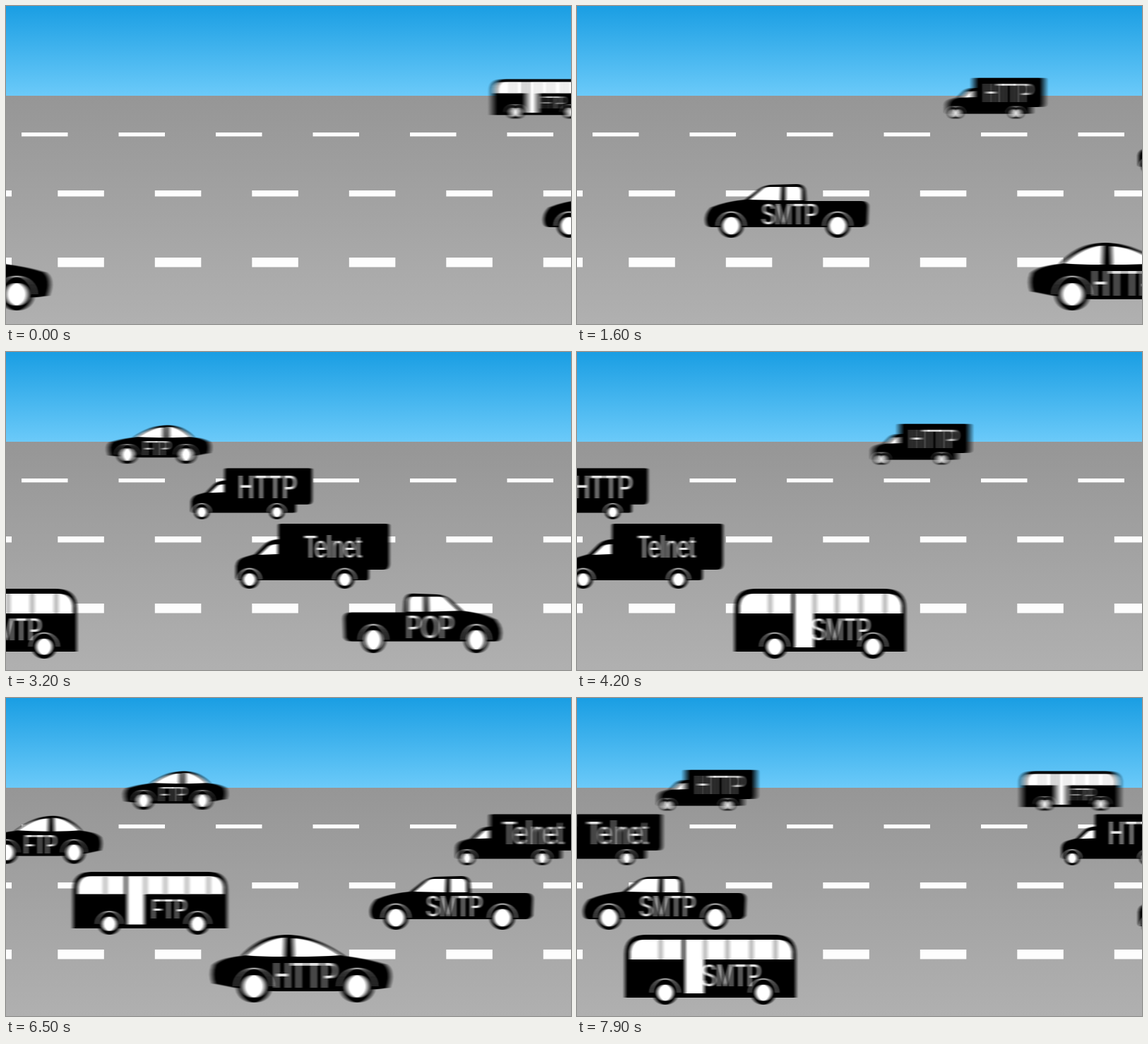
An HTML page with a canvas that plays this animation: 800 by 450 pixels, repeating every 8000 ms.

```html
<!DOCTYPE html>
<html lang="en">
<head>
<meta charset="utf-8">
<title>Protocol traffic</title>
<style>
html, body { margin: 0; width: 800px; height: 450px; overflow: hidden; }
canvas { display: block; }
</style>
</head>
<body>
<canvas id="stage" width="800" height="450"></canvas>
<script>
const WIDTH = 800, LOOP = 8000, STEP = 100;
const SHUTTER = 20;      // ms of motion blur
const SAMPLES = 15;
const CONDENSED = 0.69;  // one narrow letter shape for all labels
const PAD = 260, FLOOR = 106;  // left wheel and road line inside a sprite

// Outlines face left; x = 0 is the front wheel, y = 0 the roof.
const car = {
  unit: 1, base: 146, height: 96, lift: 3, tire: 23, rim: 16,
  label: { x: 73, y: 57.5, cap: 35 },
  body: 'M-44 75Q-52 52-40 42Q-15 34 18 30C50 8 75 0 100 0C130 0 148 14 163 30Q194 33 203 43Q208 56 203 69L158 78L115 80H30L-30 77Z',
  glass: 'M24 29Q58 6 91 5L90 31Q50 31 24 29ZM102 4Q130 5 158 29Q140 31 103 31Z'
};
const bus = {
  unit: 1, base: 139, height: 99, lift: 0, tire: 17, rim: 11.5, symmetric: true,
  label: { x: 94, y: 58, cap: 30 },
  body: 'M-57 89V28Q-57 0-28 0H156Q185 0 185 28V89Z',
  glass: 'M-50 35V24Q-48 7-30 7H24V35ZM28 7H160Q178 8 180 24V35H55V83H28Z',
  posts: [-6.5, 56.5, 88, 122, 156]
};
const truck = {
  unit: 1.11, base: 135, height: 92, lift: 0, tire: 13, rim: 9,
  label: { x: 118, y: 33, cap: 41 },
  body: 'M-19 75V60Q-18 50-6 47L8 43L22 29Q28 23 41 22V3Q41 0 44 0H194Q198 0 198 3V57Q198 65 190 65H169V76Q169 80 165 80H-14Q-19 80-19 75Z',
  glass: 'M14 44L27 32Q31 29 40 29V43Z'
};
const pickup = {
  unit: 1.11, base: 151, height: 76, lift: 7, tire: 17, rim: 12.5,
  label: { x: 83, y: 42, cap: 29 },
  body: 'M-35 57Q-39 44-28 33Q-10 25 20 22L38 8Q46 2 56 1L95 0Q104 1 105 10L106 24H186Q194 25 194 32L193 56Q190 61 184 61H-28Q-33 61-35 57Z',
  glass: 'M26 22L44 7Q48 4 54 4H71L70 23ZM77 4H94Q99 4 100 9V23H77Z'
};

// Lanes from far to near; the last one runs to the right.
const lanes = [
  { ground: 160, scale: .57, dir: -1 },
  { ground: 237, scale: .71, dir: -1 },
  { ground: 335, scale: .9, dir: -1 },
  { ground: 434, scale: 1, dir: 1 }
];

// enter: times at which the leading wheel reaches the edge of the stage
const fleet = [
  { lane: 0, model: bus, text: 'FTP', speed: .7025, enter: [-112, 4353, 7704] },
  { lane: 0, model: truck, text: 'HTTP', speed: .65, enter: [1194, 3632, 6866] },
  { lane: 0, model: car, text: 'FTP', speed: .537, enter: [2030, 5373] },
  { lane: 1, model: truck, text: 'HTTP', speed: .333, enter: [1630, 7603] },
  { lane: 1, model: car, text: 'FTP', speed: .409, enter: [4546], stretch: .92 },
  { lane: 1, model: truck, text: 'Telnet', speed: .492, enter: [6201] },
  { lane: 2, model: pickup, text: 'SMTP', speed: .362, enter: [-7, 5815] },
  { lane: 2, model: truck, text: 'Telnet', speed: .336, enter: [1845, 7942], size: .75 },
  { lane: 2, model: bus, text: 'FTP', speed: .394, enter: [4841] },
  { lane: 3, model: car, text: 'HTTP', speed: .52, enter: [-29, 5544] },
  { lane: 3, model: pickup, text: 'POP', speed: .45, enter: [1720], stretch: .87 },
  { lane: 3, model: bus, text: 'SMTP', speed: .365, enter: [3052, 7177] }
];

function layer() {
  const canvas = document.createElement('canvas');
  canvas.width = 2 * PAD;
  canvas.height = FLOOR + 4;
  return canvas.getContext('2d');
}

function disc(c, x, y, r, color) {
  c.fillStyle = color;
  c.beginPath();
  c.arc(x, y, r, 0, 7);
  c.fill();
}

function drawBody(c, m) {
  c.fillStyle = '#000';
  c.fill(new Path2D(m.body));
  c.fillStyle = '#fdfdfd';
  c.fill(new Path2D(m.glass));
  c.fillStyle = '#b4b4b4';
  for (const x of m.posts || []) c.fillRect(x - 3, 7, 6, 28);
  const axle = m.height - m.tire;
  for (const x of [0, m.base]) {
    disc(c, x, axle, m.tire, '#000');
    c.strokeStyle = '#aaa';
    c.lineWidth = 2;
    c.beginPath();
    c.arc(x, axle, m.tire + 2.5, Math.PI, 2 * Math.PI);
    c.stroke();
    disc(c, x, axle, m.rim, '#fff');
  }
}

function drawVehicle(c, { model: m, text, stretch = 1, size = 1 }, lane) {
  const k = lane.scale * m.unit, cap = m.label.cap * size;
  c.translate(PAD, FLOOR);
  c.scale(k, k);
  c.translate(0, -m.height - m.lift);
  c.save();
  c.scale(stretch, 1);
  if (lane.dir > 0 && !m.symmetric) {
    c.translate(m.base, 0);
    c.scale(-1, 1);
  }
  drawBody(c, m);
  c.restore();
  c.translate(m.label.x * stretch, m.label.y + cap / 2);
  c.scale(CONDENSED, 1);
  c.font = `${cap / .69}px "Liberation Sans", Arial, sans-serif`;
  c.textAlign = 'center';
  c.fillStyle = '#d8d8d8';
  c.fillText(text, 0, 0);
}

// Average of copies spread along the path, as an open shutter records it.
function blurred(v, lane) {
  const sharp = layer(), soft = layer();
  drawVehicle(sharp, v, lane);
  soft.globalCompositeOperation = 'lighter';
  soft.globalAlpha = 1 / SAMPLES;
  for (let i = 0; i < SAMPLES; i++) {
    soft.drawImage(sharp.canvas, v.speed * SHUTTER * ((i + .5) / SAMPLES - .5), 0);
  }
  return soft.canvas;
}

for (const v of fleet) {
  const lane = lanes[v.lane];
  const base = v.model.base * v.model.unit * lane.scale * (v.stretch || 1);
  v.sprite = blurred(v, lane);
  v.y = lane.ground - FLOOR;
  v.velocity = v.speed * lane.dir;
  v.start = (lane.dir < 0 ? WIDTH : -base) - PAD;
}

const ctx = document.getElementById('stage').getContext('2d');

function band(y, h, from, to) {
  const g = ctx.createLinearGradient(0, y, 0, y + h);
  g.addColorStop(0, from);
  g.addColorStop(1, to);
  ctx.fillStyle = g;
  ctx.fillRect(0, y, WIDTH, h);
}

function dashes(x, y, h) {
  for (; x < WIDTH; x += 137.5) ctx.fillRect(x, y, 65.5, h);
}

function drawRoad() {
  band(0, 127, '#1a9ee3', '#6bcaf9');
  band(127, 323, '#969696', '#b0b0b0');
  ctx.fillStyle = '#fdfdfd';
  dashes(22, 179, 5.5);
  for (const [y, h] of [[261, 8.5], [356, 13.5]]) {
    dashes(73.3, y, h);
    ctx.fillRect(0, y, 8, h);
  }
}

function frame(now) {
  const t = Math.floor(now % LOOP / STEP) * STEP;
  drawRoad();
  for (const v of fleet) {
    for (const enter of v.enter) {
      ctx.drawImage(v.sprite, v.start + v.velocity * (t - enter), v.y);
    }
  }
  requestAnimationFrame(frame);
}
frame(0);
</script>
</body>
</html>
```
